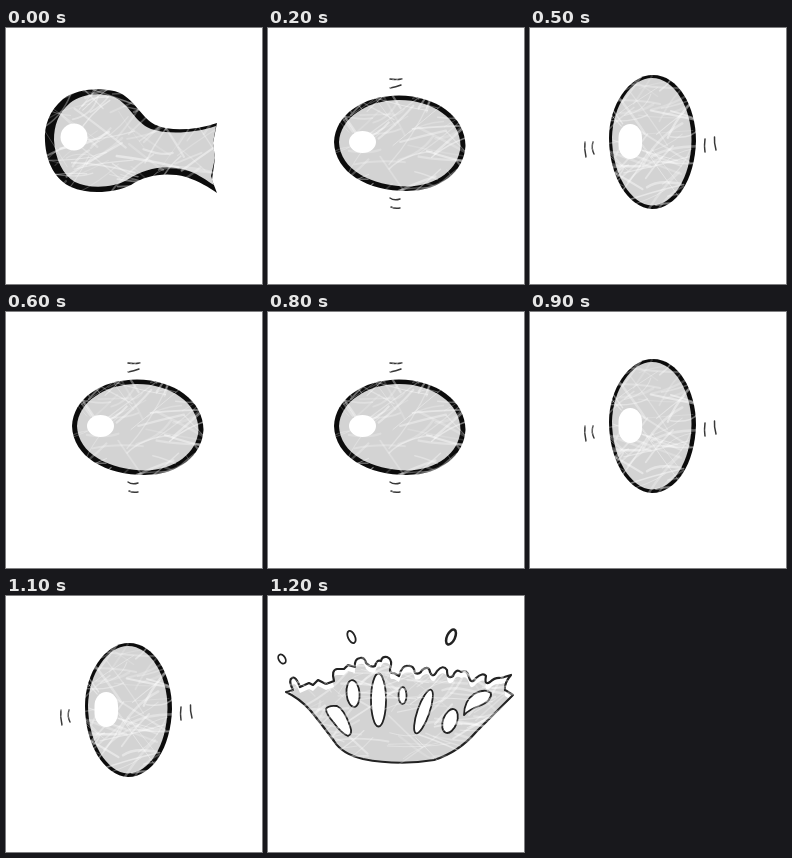
These frames come from a looping animation (256x256 px, 1.3 s). An HTML page:

```html
<!DOCTYPE html>
<html lang="en">
<head>
<meta charset="utf-8">
<title>Wobbling drop</title>
<style>
  html, body { margin: 0; width: 100%; height: 100%; overflow: hidden; background: #fff; }
  svg { display: block; width: 100%; height: 100%; }
  .pose { display: none; }
  .pose.on { display: inline; }
  .rim { fill: #0c0c0c; }
  .body { fill: #d3d3d3; }
  .hole { fill: #fff; }
  .ink { fill: none; stroke: #222; stroke-width: 2.2; stroke-linecap: round; stroke-linejoin: round; }
  .mark { stroke: #383838; stroke-width: 1.5; }
  .inked { fill: #fff; stroke: #222; stroke-width: 1.8; stroke-linejoin: round; }
  .scratch { fill: none; stroke: #fff; stroke-linecap: round; }
</style>
</head>
<body>
<svg viewBox="0 0 256 256">
  <defs>
    <path id="crown" d="M18 96 L25 94 Q20 84 24 82 Q28 80 32 91 L41 87 L45 89 L50 84 L58 88 L66 85
      Q63 74 69 73 L76 73 L80 69 L87 71 Q86 63 92 62 Q97 61 98 67 Q103 72 107 70 Q109 63 113 65
      Q114 60 119 61 Q124 63 123 69 Q120 78 126 77 L131 80 Q134 69 140 70 Q146 69 147 77
      Q152 79 154 74 Q161 69 162 76 Q165 83 169 75 Q175 68 179 74 Q179 84 185 80 Q188 72 193 76
      Q199 73 201 81 Q203 89 208 82 Q215 76 218 80 Q216 90 222 86 Q227 81 233 82 L243 79
      Q236 87 237 94 L245 99 L240 104 Q225 119 208 136 Q191 156 166 164 Q130 170 95 163
      Q74 158 66 145 Q52 126 42 114 Q31 102 18 96Z"/>
    <clipPath id="inside"><use href="#crown"/></clipPath>
  </defs>

  <g class="pose" id="fish">
    <path class="rim" d="M211 95 C190 102 165 104 150 97 C136 91 130 73 114 65
      C99 59 72 60 57 71 C43 83 38 98 39 113 C40 135 50 152 65 159 C82 167 109 165 125 157
      C140 147 160 144 180 149 C193 153 204 160 211 165 L206 152 L209 130 L207 115Z"/>
    <path class="body" d="M210 98 C190 105 162 107 145 101 C128 94 124 76 108 69
      C94 64 75 66 64 75 C52 85 48 98 48 112 C49 131 57 147 69 154 C83 161 107 160 121 152
      C140 139 164 136 183 143 C194 147 201 153 208 157 L205 148 L209 130 L207 115Z"/>
    <g class="scratches" data-box="40 60 172 106" data-seed="11"></g>
    <circle class="hole" cx="68" cy="109" r="13.5"/>
  </g>

  <g class="pose" id="tail">
    <path class="rim" d="M230 114 C203 109 178 98 160 85 C143 72 126 64 107 65
      C75 67 52 87 52 114 C52 143 78 164 108 163 C135 163 150 151 168 138 C185 127 208 120 230 114Z"/>
    <path class="body" d="M220 114 C198 111 174 103 156 90 C140 77 125 70 108 71
      C80 73 59 90 59 114 C59 139 82 157 108 157 C132 157 147 145 164 133 C180 123 201 118 220 114Z"/>
    <g class="scratches" data-box="52 64 178 100" data-seed="29"></g>
    <ellipse class="hole" cx="81" cy="112" rx="13.5" ry="12.5"/>
  </g>

  <g class="pose" id="wide">
    <path class="rim" d="M66 114 C67 87 95 67.5 131 67.5 C168 68 197 88 197.5 118
      C196 144 172 163 139 163 C100 163 67 145 66 114Z"/>
    <path class="body" d="M71 114 C72 91 98 72 131 72 C165 72 192 91 192.5 118
      C191 141 169 158 139 158.5 C104 158 72 142 71 114Z"/>
    <path class="ink mark" d="M122 51 Q128 52 134 51 M122 60 Q128 59 133 57
      M122 170 Q126 173 132 171 M123 179 Q127 181 132 180"/>
    <g class="scratches" data-box="66 48 132 132" data-seed="47"></g>
    <ellipse class="hole" cx="94.5" cy="114" rx="13.5" ry="11"/>
  </g>

  <g class="pose" id="tall">
    <path class="rim" d="M79 110 C79 77 99 47 123 47 C148 47 166 78 166 113
      C165 152 146 181 122 181 C98 180 79 148 79 110Z"/>
    <path class="body" d="M82 109 C83 78 101 50 122 50 C144 50 161.5 79 161.5 112
      C161 150 143 177 122 177.5 C101 177 82 146 82 109Z"/>
    <path class="ink mark" d="M55 114 Q54 121 56 129 M63 114 Q61 120 64 126
      M175 111 Q174 118 175 124 M184.5 109 Q184 115 186 122"/>
    <g class="scratches" data-box="70 47 104 134" data-seed="83"></g>
    <rect class="hole" x="88.5" y="96" width="23.5" height="35" rx="11.75" ry="14"/>
  </g>

  <g class="pose" id="splash">
    <g clip-path="url(#inside)">
      <use class="body" href="#crown" y="6"/>
      <path class="body" d="M26 100 L240 104 L208 136 Q191 156 166 164 Q130 170 95 163 Q74 158 66 145Z"/>
    </g>
    <use class="ink" href="#crown"/>
    <g class="inked">
      <ellipse cx="85" cy="97.5" rx="6.5" ry="13.5" transform="rotate(-5 85 97)"/>
      <ellipse cx="110.5" cy="104" rx="7.5" ry="26.5"/>
      <ellipse cx="134.5" cy="99.5" rx="4" ry="8.5"/>
      <ellipse cx="155.5" cy="115.5" rx="6" ry="23" transform="rotate(19 155.5 115.5)"/>
      <ellipse cx="182" cy="125" rx="7" ry="12.5" transform="rotate(20 182 125)"/>
      <path d="M58 113 Q60 109 69 110 Q76 113 82 130 Q85 138 80 140 Q73 137 66 127 Q58 118 58 113Z"/>
      <path d="M196 119 Q196 105 206 98 Q217 92 223 97 Q224 105 211 110 Q202 113 196 119Z"/>
      <ellipse cx="83.5" cy="41" rx="3.5" ry="6.5" transform="rotate(-25 83.5 41)"/>
      <ellipse cx="183" cy="41" rx="4" ry="8" transform="rotate(25 183 41)" stroke-width="2.5"/>
      <ellipse cx="14" cy="63" rx="3.3" ry="5" transform="rotate(-30 14 63)"/>
    </g>
    <g class="scratches" data-box="14 64 232 104" data-seed="61"></g>
  </g>
</svg>
<script>
  const STEP = 100;
  const order = ["fish", "tail", ...Array(5).fill(["wide", "tall"]).flat(), "splash"];
  const poses = document.querySelectorAll(".pose");

  function seeded(seed) {
    return () => (seed = (seed * 16807) % 2147483647) / 2147483647;
  }

  // Curved white scratches lighten ink and body alike and vanish on the page.
  function addScratches(group) {
    const [x, y, w, h] = group.dataset.box.split(" ").map(Number);
    const rand = seeded(group.dataset.seed * 7919);
    const count = w * h / 190;
    for (let i = 0; i < count; i++) {
      const angle = (i % 3 ? -0.45 : 0.5) + (rand() - 0.5) * 1.1;
      const half = 10 + rand() * 28;
      const bend = (rand() - 0.5) * 14;
      const cx = x + rand() * w, cy = y + rand() * h;
      const dx = Math.cos(angle) * half, dy = Math.sin(angle) * half;
      const line = document.createElementNS("http://www.w3.org/2000/svg", "path");
      line.setAttribute("class", "scratch");
      line.setAttribute("d", `M${cx - dx} ${cy - dy} Q${cx + bend} ${cy + bend} ${cx + dx} ${cy + dy}`);
      line.setAttribute("stroke-width", 0.7 + rand() * 1.9);
      line.setAttribute("opacity", 0.15 + rand() * 0.3);
      group.append(line);
    }
  }

  function show(now) {
    const name = order[Math.floor(now / STEP) % order.length];
    poses.forEach(p => p.classList.toggle("on", p.id === name));
  }

  function tick() {
    show(performance.now() - start);
    requestAnimationFrame(tick);
  }

  document.querySelectorAll(".scratches").forEach(addScratches);
  const start = performance.now();
  tick();
</script>
</body>
</html>
```
